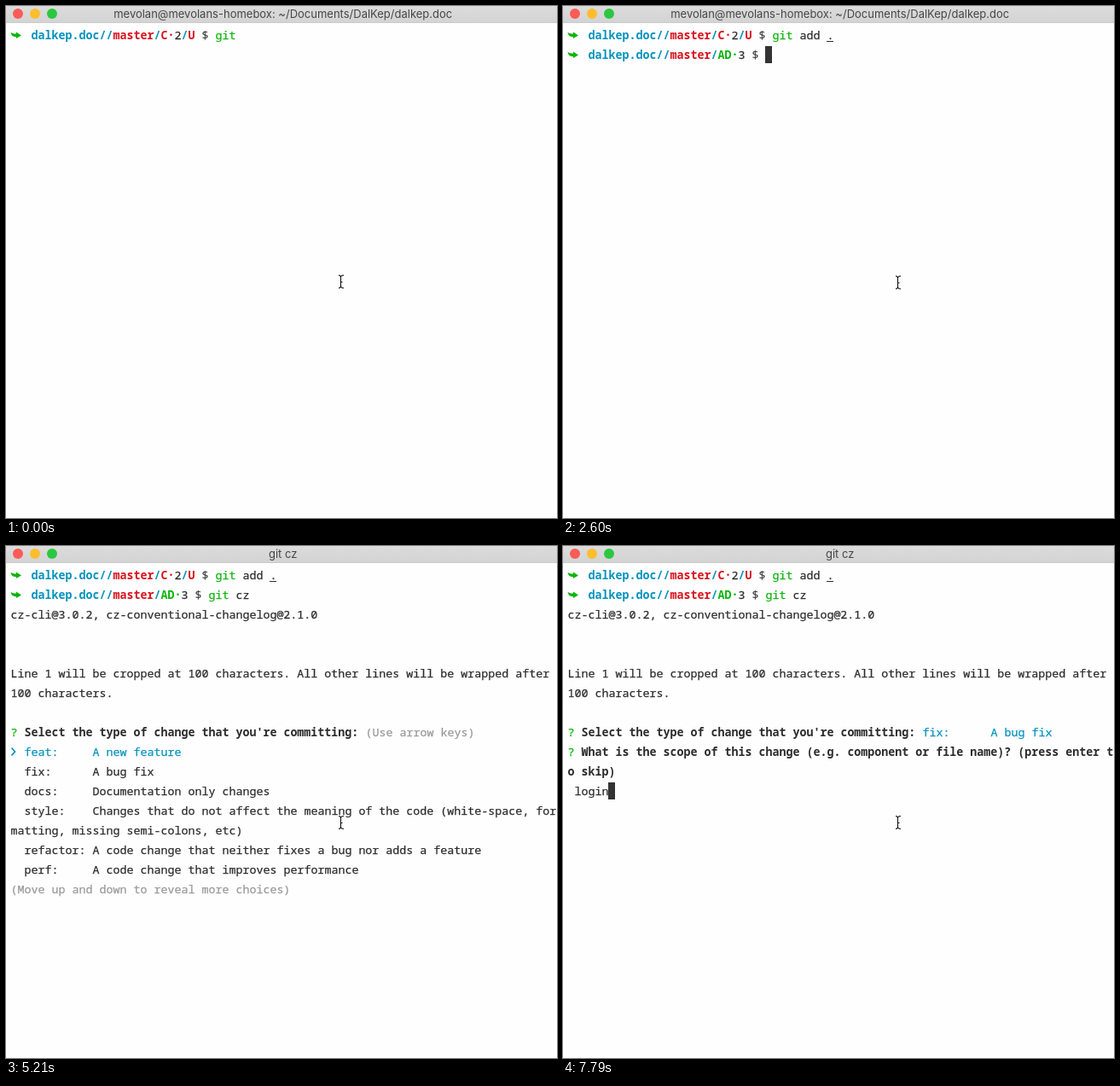
Animation, 646 px wide and 600 px high, one loop 8 s. Source, as an HTML page with a canvas:

```html
<!DOCTYPE html>
<html lang="en">
<head>
<meta charset="utf-8">
<title>Terminal</title>
<style>
  html, body { margin: 0; width: 100%; height: 100%; overflow: hidden; background: #fefefe; }
  canvas { display: block; }
</style>
</head>
<body>
<canvas id="stage" width="646" height="600"></canvas>
<script>
const ctx = document.getElementById('stage').getContext('2d');
const LOOP = 8000, CELL = 8, ROW = 23, LEFT = 5;
const INK = '#2c2c2c', BLUE = '#0593bd', RED = '#d9131d', GREEN = '#0bb50b', GREY = '#999999';
const HOME_TITLE = 'mevolan@mevolans-homebox: ~/Documents/DalKep/dalkep.doc';

// Each step holds from its time until the next one.
const FIRST_TYPING = [[0, 'git'], [690, 'git '], [1290, 'git a'], [1460, 'git ad'],
  [1640, 'git add'], [1760, 'git add '], [1940, 'git add .']];
const SECOND_TYPING = [[2600, ''], [3010, 'g'], [3100, 'gi'], [3190, 'git'],
  [3360, 'git '], [3780, 'git c'], [4200, 'git cz']];
const SCOPE_TYPING = [[6550, ''], [7320, 'l'], [7440, 'lo'], [7620, 'log'], [7710, 'logi'], [7790, 'login']];
const TITLES = [[0, HOME_TITLE], [2240, 'git add .'], [2360, HOME_TITLE], [4670, 'git cz']];

const CHOICES = [
  [9, 'feat:', 'A new feature'],
  [10, 'fix:', 'A bug fix'],
  [11, 'docs:', 'Documentation only changes'],
  [12, 'style:', 'Changes that do not affect the meaning of the code (white-space, for'],
  [14, 'refactor:', 'A code change that neither fixes a bug nor adds a feature'],
  [15, 'perf:', 'A code change that improves performance']
];

const stepAt = (steps, t) => steps.filter(([start]) => start <= t).pop()[1];
const cellX = col => LEFT + col * CELL;
const rowY = row => 34 + row * ROW;

function write(col, row, text, color = INK, bold = false) {
  const x = cellX(col) + 0.5, y = rowY(row) + 5;
  ctx.font = `${bold ? 600 : 500} 13.333px "Noto Sans Mono", "DejaVu Sans Mono", monospace`;
  ctx.textAlign = 'left';
  ctx.fillStyle = ctx.strokeStyle = color;
  ctx.fillText(text, x, y);
  if (!bold) {
    // A hairline gives the regular weight its sturdier stems.
    ctx.lineWidth = 0.25;
    ctx.strokeText(text, x, y);
  }
  return col + text.length;
}

function cursor(col, row) {
  ctx.fillStyle = '#333333';
  ctx.fillRect(cellX(col), rowY(row) - 10, CELL, 20);
}

function underline(col, row) {
  ctx.fillStyle = INK;
  ctx.fillRect(cellX(col), rowY(row) + 7, CELL, 1);
}

function promptArrow(row) {
  const y = rowY(row);
  ctx.fillStyle = GREEN;
  ctx.beginPath();
  ctx.moveTo(5.5, y - 3.5);
  ctx.quadraticCurveTo(7, y - 1.4, 12, y - 1.4);
  ctx.lineTo(12, y - 3.5);
  ctx.lineTo(18, y + 0.4);
  ctx.lineTo(12, y + 4);
  ctx.lineTo(12, y + 2.2);
  ctx.quadraticCurveTo(6, y + 2.6, 5.5, y - 3.5);
  ctx.fill();
}

function prompt(row, status) {
  promptArrow(row);
  let col = write(3, row, 'dalkep.doc//', BLUE, true);
  col = write(col, row, 'master', RED, true);
  col = write(col, row, '/', BLUE, true);
  for (const [text, color, bold] of status) col = write(col, row, text, color, bold);
  return write(col, row, ' $ ', '#444444');
}

function command(col, row, text) {
  const name = text.slice(0, 3);
  write(col, row, name, name === 'git' ? GREEN : RED);
  write(col + 3, row, text.slice(3));
  if (/ [.c]$/.test(text)) underline(col + text.length - 1, row);
  return col + text.length;
}

function titleBar(t) {
  const shade = ctx.createLinearGradient(0, 0, 0, 19);
  shade.addColorStop(0, '#dcdcdc');
  shade.addColorStop(1, '#d3d3d3');
  ctx.fillStyle = shade;
  ctx.fillRect(0, 0, 646, 19);
  ctx.fillStyle = '#cbcbcb';
  ctx.fillRect(0, 19, 646, 1);

  ['#fc5b57', '#fdbd2f', '#2ac840'].forEach((color, i) => {
    ctx.fillStyle = color;
    ctx.beginPath();
    ctx.arc(14 + i * 20, 9, 6, 0, Math.PI * 2);
    ctx.fill();
  });

  ctx.font = '13px Inter, Roboto, sans-serif';
  ctx.textAlign = 'center';
  ctx.fillStyle = '#464646';
  ctx.fillText(stepAt(TITLES, t), 324.7, 14);
}

function typeMenu(selected) {
  if (!selected) write(52, 8, '(Use arrow keys)', GREY);
  CHOICES.forEach(([row, label, text], i) => {
    const color = i === selected ? BLUE : INK;
    write(2, row, label, color);
    write(12, row, text, color);
  });
  write(0, 13, 'matting, missing semi-colons, etc)');
  write(0, 16, '(Move up and down to reveal more choices)', GREY);

  const y = rowY(9 + selected);
  ctx.strokeStyle = BLUE;
  ctx.lineWidth = 1.7;
  ctx.beginPath();
  ctx.moveTo(6.5, y - 4.5);
  ctx.lineTo(10.5, y);
  ctx.lineTo(6.5, y + 4.5);
  ctx.stroke();
}

function scopeQuestion(t) {
  write(52, 8, 'fix:', BLUE);
  write(62, 8, 'A bug fix', BLUE);
  write(0, 9, '?', GREEN);
  write(2, 9, 'What is the scope of this change (e.g. component or file name)? (press enter t', INK, true);
  write(0, 10, 'o skip)', INK, true);
  cursor(write(1, 11, stepAt(SCOPE_TYPING, t)), 11);
}

function commitDialog(t) {
  write(0, 2, 'cz-cli@3.0.2, cz-conventional-changelog@2.1.0');
  write(0, 5, 'Line 1 will be cropped at 100 characters. All other lines will be wrapped after');
  write(0, 6, '100 characters.');
  write(0, 8, '?', GREEN);
  write(2, 8, "Select the type of change that you're committing:", INK, true);
  if (t < 6550) typeMenu(t < 6160 ? 0 : 1);
  else scopeQuestion(t);
}

function pointer(t) {
  const x = 392.5, y = t < 1380 ? 323 : 324;
  ctx.beginPath();
  for (const s of [-1, 1]) {
    ctx.moveTo(x - 2.5, y + s * 7.5);
    ctx.quadraticCurveTo(x, y + s * 7.5, x, y + s * 5);
    ctx.quadraticCurveTo(x, y + s * 7.5, x + 3.5, y + s * 7.5);
  }
  ctx.moveTo(x, y - 6);
  ctx.lineTo(x, y + 6);
  ctx.moveTo(x, y + 0.5);
  ctx.lineTo(x + 2, y + 0.5);
  ctx.strokeStyle = '#fefefe';
  ctx.lineWidth = 2.4;
  ctx.stroke();
  ctx.strokeStyle = '#111111';
  ctx.lineWidth = 1.1;
  ctx.stroke();
}

function draw(t) {
  ctx.fillStyle = '#fefefe';
  ctx.fillRect(0, 0, 646, 600);
  titleBar(t);

  const start = prompt(0, [['C·', RED, true], ['2', INK], ['/', BLUE, true], ['U', RED, true]]);
  const end = command(start, 0, stepAt(FIRST_TYPING, t));
  if (t >= 480 && t < 2240) cursor(end, 0);
  if (t >= 2240 && t < 2600) cursor(0, 1);

  if (t >= 2600) {
    const col = prompt(1, [['AD·', GREEN, true], ['3', INK]]);
    const tail = command(col, 1, stepAt(SECOND_TYPING, t));
    if (t < 4610) cursor(tail, 1);
    else if (t < 5210) cursor(0, 2);
  }
  if (t >= 5210) commitDialog(t);
  pointer(t);
}

const begin = performance.now();
function tick() {
  draw((performance.now() - begin) % LOOP);
  requestAnimationFrame(tick);
}
tick();
</script>
</body>
</html>
```
